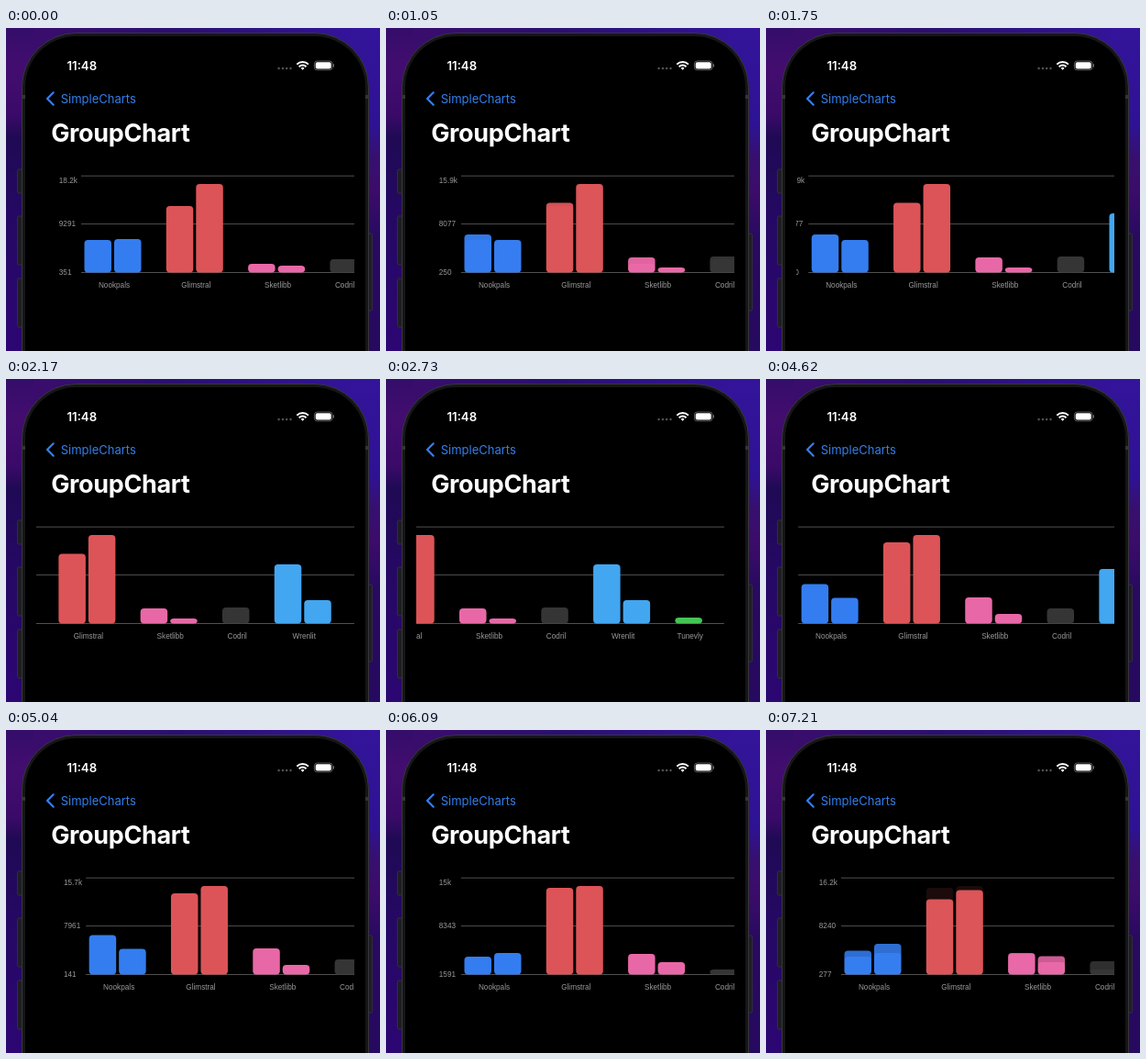
These frames come from a looping animation (408x352 px, 7.28 s). An HTML page:

```html
<!DOCTYPE html>
<html lang="en">
<head>
<meta charset="utf-8">
<title>GroupChart</title>
<style>
  html, body { margin: 0; width: 100%; height: 100%; overflow: hidden; background: #000; }
  svg { display: block; width: 408px; height: 352px; font-family: Inter, "Liberation Sans", sans-serif; }
  .title { font-size: 27px; font-weight: 700; letter-spacing: -.35px; fill: #fff; }
  .back { font-size: 13px; fill: #347fec; }
  .clock { font-size: 13.2px; font-weight: 600; fill: #fff; }
  .axis, .name { font: 8.2px "Liberation Sans", Arial, sans-serif; fill: #999; }
  .name { text-anchor: middle; }
  .bars { isolation: isolate; }
  .bars g { mix-blend-mode: plus-lighter; }
</style>
</head>
<body>
<svg viewBox="0 0 408 352">
  <defs>
    <linearGradient id="left" x2="0" y2="1">
      <stop offset="0" stop-color="#340d6a"/><stop offset=".12" stop-color="#430d70"/>
      <stop offset=".27" stop-color="#3a0a68"/><stop offset=".34" stop-color="#1f0a54"/>
      <stop offset=".6" stop-color="#250864"/><stop offset="1" stop-color="#2c0672"/>
    </linearGradient>
    <linearGradient id="right" x2="0" y2="1">
      <stop offset="0" stop-color="#33149a"/><stop offset=".3" stop-color="#2e1294"/>
      <stop offset=".4" stop-color="#36106f"/><stop offset=".5" stop-color="#3c0c6a"/>
      <stop offset=".65" stop-color="#280a60"/><stop offset="1" stop-color="#260a60"/>
    </linearGradient>
    <linearGradient id="top">
      <stop offset="0" stop-color="#3a0d6c"/><stop offset=".45" stop-color="#2b0f70"/>
      <stop offset="1" stop-color="#33149a"/>
    </linearGradient>
    <clipPath id="viewport"><rect x="33" y="150" width="347" height="145"/></clipPath>
  </defs>

  <rect width="204" height="352" fill="url(#left)"/>
  <rect x="204" width="204" height="352" fill="url(#right)"/>
  <rect x="30" width="348" height="30" fill="url(#top)"/>

  <g fill="#1e1e22" stroke="#35353a" stroke-width=".8">
    <rect x="12.5" y="154" width="6" height="26" rx="1.5"/>
    <rect x="12.5" y="205" width="6" height="53" rx="1.5"/>
    <rect x="12.5" y="273" width="6" height="53" rx="1.5"/>
    <rect x="393" y="224" width="6.5" height="84" rx="1.5"/>
  </g>
  <rect x="17.5" y="5.5" width="378" height="440" rx="59" fill="#161618" stroke="#37373b"/>
  <path d="M17 75h4M392 75h4" stroke="#343438" stroke-width="4"/>
  <rect x="21" y="9" width="371" height="440" rx="55.5"/>

  <text class="clock" x="66.5" y="45.5">11:48</text>
  <g fill="#555">
    <circle cx="297.6" cy="44" r="1.2"/><circle cx="301.9" cy="44" r="1.2"/>
    <circle cx="306.2" cy="44" r="1.2"/><circle cx="310.5" cy="44" r="1.2"/>
  </g>
  <g fill="none" stroke="#fff" stroke-width="2">
    <path d="M317.3 39.6a9 9 0 0 1 12.6 0"/>
    <path d="M319.7 42.2a5.5 5.5 0 0 1 7.8 0"/>
  </g>
  <path d="M321.7 43.7a2.7 2.7 0 0 1 3.8 0l-1.9 2z" fill="#fff"/>
  <rect x="336.4" y="36" width="19.6" height="9.8" rx="3" fill="none" stroke="#666" stroke-width=".9"/>
  <rect x="337.7" y="37.3" width="17" height="7.2" rx="1.8" fill="#fff"/>
  <path d="M357.3 39.3v3.2" stroke="#777" stroke-width="1.2"/>

  <path d="M51.7 70.3L45 77l6.7 6.7" fill="none" stroke="#347fec" stroke-width="2.2" stroke-linecap="round" stroke-linejoin="round"/>
  <text class="back" x="59.7" y="81.5">SimpleCharts</text>
  <text class="title" x="49.2" y="124">GroupChart</text>

  <g clip-path="url(#viewport)"><g id="chart">
    <path d="M82 161.2H553M82 213.6H553M82 266.5H553" stroke="#505050" stroke-width="1"/>
  </g></g>
</svg>
<script>
const LOOP = 7280, BASE = 266.5, BAR = 29.5, STEP = 32.5, GAP = 27.3;

const groups = [
  { name: "Nookpals", color: "#347df0", bars: 2 },
  { name: "Glimstral", color: "#dc5457", bars: 2 },
  { name: "Sketlibb", color: "#e868a7", bars: 2 },
  { name: "Codril", color: "#353535", bars: 1 },
  { name: "Wrenlit", color: "#43a6f0", bars: 2 },
  { name: "Tunevly", color: "#45c454", bars: 1 },
];

// Each data set appears at its start time; tops are the upper edges of the bars.
const dataSets = [
  { start: -2000, axis: ["18.2k", "9291", "351"], tops: [231, 230, 194, 170, 257, 259, 252, 214, 238, 258] },
  { start: 650, axis: ["15.9k", "8077", "250"], tops: [225, 231, 190.5, 170, 250, 261, 249, 202, 241, 260] },
  { start: 3120, axis: ["15.7k", "7961", "141"], tops: [223.5, 238.5, 178, 170, 238, 256, 250, 207, 248, 261] },
  { start: 5360, axis: ["15k", "8343", "1591"], tops: [247, 243, 172, 170, 244, 253, 261, 221, 246, 258] },
  { start: 6920, axis: ["16.2k", "8240", "277"], tops: [240.5, 233, 184.5, 174.5, 243, 246.5, 252, 170, 236, 260] },
];

// Scroll path: time, offset, velocity in px/ms.
const scrollPath = [
  [1500, 0, 0], [1750, -35.5, -.23], [2730, -184, -.08], [3080, -196.5, 0],
  [4235, -196.5, 0], [4480, -110, .5], [4800, 0, .12], [4920, 8, 0],
  [5040, 5.2, -.03], [5340, 0, 0],
];

const chart = document.getElementById("chart");

function add(parent, tag, attributes, text = "") {
  const node = document.createElementNS("http://www.w3.org/2000/svg", tag);
  for (const key in attributes) node.setAttribute(key, attributes[key]);
  node.textContent = text;
  return parent.appendChild(node);
}

const slots = [];
let left = 85.5;
for (const { name, color, bars } of groups) {
  const width = bars * STEP - STEP + BAR;
  for (let i = 0; i < bars; i++) slots.push({ x: left + i * STEP, color });
  add(chart, "text", { class: "name", x: left + width / 2 + 1.5, y: 282.5 }, name);
  left += width + GAP;
}

const barGroup = add(chart, "g", { class: "bars" });
const layers = dataSets.map(({ tops }) => {
  const layer = add(barGroup, "g", {});
  tops.forEach((y, i) => add(layer, "rect", {
    x: slots[i].x, y, width: BAR, height: BASE - y, rx: 4, fill: slots[i].color,
  }));
  return layer;
});

const axisLabels = [169.2, 216.4, 269.4].map(y => add(chart, "text", { class: "axis", x: 57.8, y }));

function spring(ms) {
  const phase = Math.max(0, ms) / 1000 * 2 * Math.PI / .5;
  return 1 - (1 + phase) * Math.exp(-phase);
}

function scrollAt(time) {
  const next = scrollPath.findIndex(point => point[0] > time);
  if (next < 1) return 0;
  const [t0, x0, v0] = scrollPath[next - 1], [t1, x1, v1] = scrollPath[next];
  const span = t1 - t0, u = (time - t0) / span, w = 1 - u;
  return w * w * ((1 + 2 * u) * x0 + u * span * v0) + u * u * ((3 - 2 * u) * x1 - w * span * v1);
}

function render(time) {
  chart.setAttribute("transform", `translate(${scrollAt(time)} 0)`);
  const current = dataSets.findLastIndex(set => set.start <= time);
  const progress = spring(time - dataSets[current].start);
  layers.forEach((layer, i) => {
    const opacity = i === current ? progress : i === current - 1 ? 1 - progress : 0;
    layer.setAttribute("opacity", opacity.toFixed(3));
  });
  axisLabels.forEach((label, i) => { label.textContent = dataSets[current].axis[i]; });
}

const origin = performance.now();
function tick() {
  render((performance.now() - origin) % LOOP);
  requestAnimationFrame(tick);
}
tick();
</script>
</body>
</html>
```
